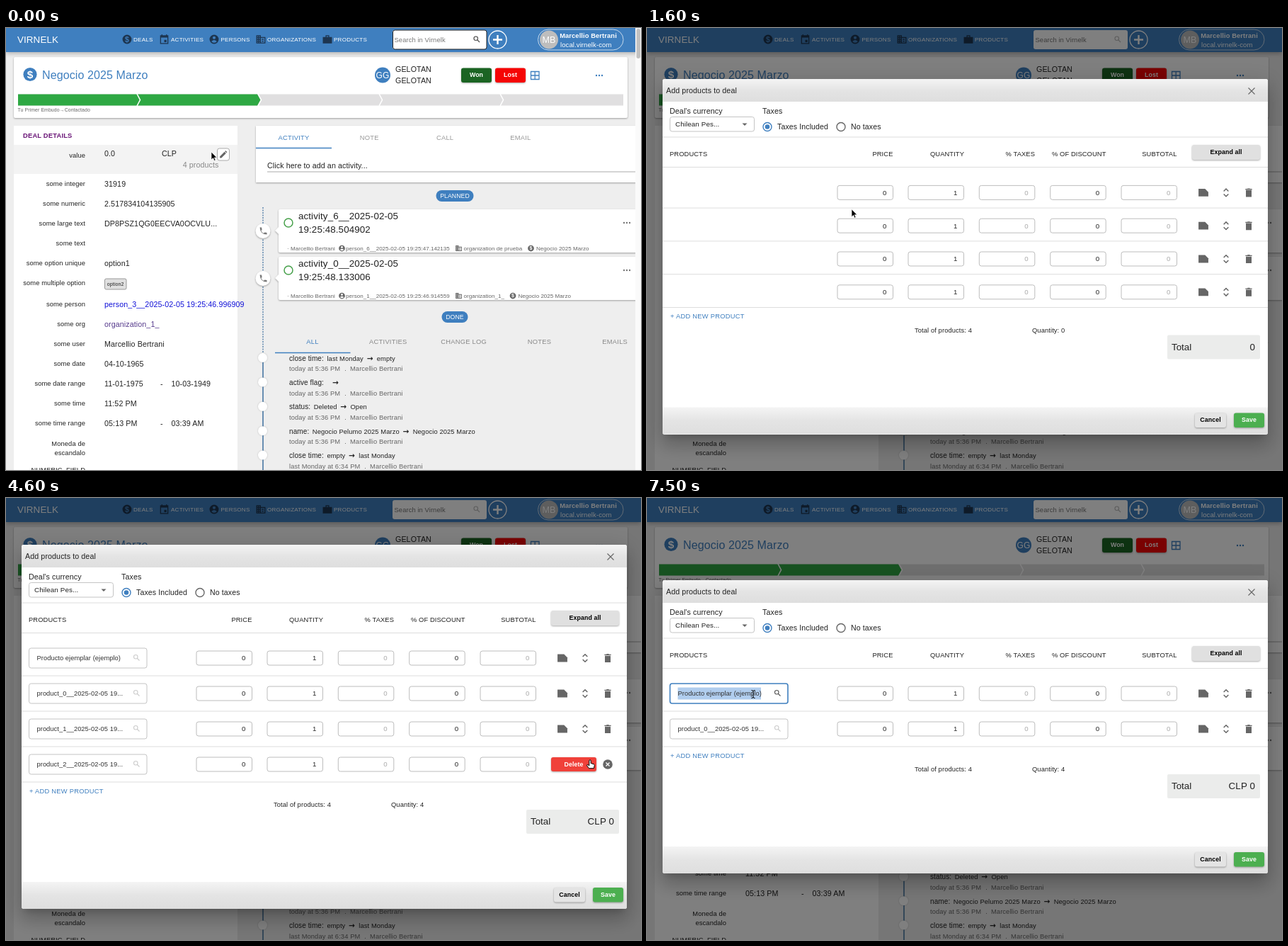
These frames come from a looping animation (897 px wide and 624 px high, 8000 ms). An HTML page:

```html
<!DOCTYPE html>
<html lang="en">
<head>
<meta charset="utf-8">
<title>Deal products</title>
<style>
html, body { margin: 0; width: 100%; height: 100%; overflow: hidden; background: #eee; }
body { position: relative; }
#page, #shade, #pointer { position: absolute; left: 0; top: 0; width: 897px; height: 624px; }
#shade { background: #000; }
#modal { position: absolute; left: 22px; width: 855px; background: #fff; border-radius: 3px; overflow: hidden;
  box-shadow: 0 7px 10px -5px #0003, 0 16px 25px 2px #00000024, 0 6px 31px 5px #0000001f; }
svg { display: block; }
text { font-family: "Liberation Sans", Arial, sans-serif; letter-spacing: .1px; }
.caps { letter-spacing: .25px; }
.card { filter: drop-shadow(0 1px 1px #0005); }
.dot { filter: drop-shadow(0 .5px 1px #0003); }
.arrow { font: bold 10.5px "DejaVu Sans", sans-serif; }
</style>
</head>
<body>
<svg id="page" viewBox="0 0 897 624"></svg>
<div id="shade"></div>
<div id="modal"></div>
<svg id="pointer" viewBox="0 0 897 624"></svg>
<script>
const BLUE = '#3f7fbf', INK = '#222', GREY = '#666', USER = 'Marcellio Bertrani';
const el = id => document.getElementById(id);

// y is the vertical middle of the capitals
const text = (x, y, s, size = 10.68, fill = INK, extra = '') =>
  `<text x="${x}" y="${y + size * .35}" font-size="${size}" fill="${fill}" ${extra}>${s}</text>`;
const MID = 'text-anchor="middle"', END = 'text-anchor="end"', BOLD = 'font-weight="bold"', CAPS = 'class="caps"';
const rect = (x, y, w, h, fill, r = 0, extra = '') =>
  `<rect x="${x}" y="${y}" width="${w}" height="${h}" rx="${r}" fill="${fill}" ${extra}/>`;
const circle = (x, y, r, fill, extra = '') => `<circle cx="${x}" cy="${y}" r="${r}" fill="${fill}" ${extra}/>`;
const line = (d, stroke, width = 1, extra = '') =>
  `<path d="${d}" fill="none" stroke="${stroke}" stroke-width="${width}" ${extra}/>`;
const hline = (x1, x2, y, stroke, width) => line(`M${x1} ${y}H${x2}`, stroke, width);
const button = (x, y, w, h, fill, label, color = '#fff') =>
  rect(x, y, w, h, fill, 3, 'class="card"') +
  text(x + w / 2, y + h / 2 - .5, label, 8.8, color, `${MID} ${BOLD}`);
const dots = (x, y, fill) => [-4, 0, 4].map(d => circle(x + d, y, 1.2, fill)).join('');

// Glyphs on a 24 unit grid
const shapes = {
  calendar: 'M3 3h3V1h2v2h8V1h2v2h3v19H3zM5 8v12h14V8zM12 13h5v5h-5z',
  org: 'M2 3h10v4h10v14H2zM4 5h2v2H4zM8 5h2v2H8zM4 9h2v2H4zM8 9h2v2H8zM4 13h2v2H4zM8 13h2v2H8zM4 17h2v2H4zM8 17h2v2H8zM12 9h8v10h-8zM14 11h4v2h-4zM14 15h4v2h-4z',
  bag: 'M2 7h20v14H2zM8 7V3h8v4h-2V5h-4v2z',
  trash: 'M6 7h12v14H6zM5 4h4l1-1h4l1 1h4v2H5z',
  note: 'M3 5h12l6 6v8H3z',
  pencil: 'M3 21v-4L15 5l4 4L7 21zM16 4l2-2 4 4-2 2z',
  phone: 'M4 4h4l1 5-2 2q2 5 6 6l2-2 5 1v4Q5 20 4 4z',
};
const strokes = { unfold: 'M7 9l5-5 5 5M7 15l5 5 5-5', search: 'M14 14l6 6M15 9.5a5.5 5.5 0 1 1-11 0a5.5 5.5 0 1 1 11 0' };
function icon(kind, x, y, size, color, back = '#fff') {
  const body = kind === 'dollar' ? circle(12, 12, 10, color) + text(12, 12, '$', 16, back, `${MID} ${BOLD}`)
    : kind === 'person' ? circle(12, 12, 10, color) + circle(12, 8.5, 3.2, back) + `<path d="M6 16.5q6-6 12 0q-6 6-12 0" fill="${back}"/>`
    : strokes[kind] ? line(strokes[kind], color, 2.2)
    : `<path d="${shapes[kind]}" fill="${color}" fill-rule="evenodd"/>`;
  return `<g transform="translate(${x - size / 2} ${y - size / 2}) scale(${size / 24})">${body}</g>`;
}

function header() {
  const navy = '#1d3550';
  const nav = [['dollar', 171, 'DEALS', 180], ['calendar', 223.5, 'ACTIVITIES', 233], ['person', 294, 'PERSONS', 303.5],
    ['org', 360, 'ORGANIZATIONS', 369], ['bag', 454, 'PRODUCTS', 463]];
  return rect(0, 0, 897, 34, BLUE, 0, 'style="filter:drop-shadow(0 2px 3px #0004)"') +
    text(16, 16.5, 'VIRNELK', 13.4, '#fff') +
    nav.map(([kind, ix, label, x]) => icon(kind, ix, 16, 15.5, navy, BLUE) + text(x, 16, label, 8.1, '#fff', 'style="letter-spacing:.2px"')).join('') +
    rect(546, 3, 133, 27, '#fff', 3) + text(548.5, 16.5, 'Search in Virnelk', 9.35, '#777') + icon('search', 665, 16, 12, '#bbb') +
    circle(694.5, 16.5, 12.5, 'none', 'stroke="#fff" stroke-width="1.3"') + line('M694.5 10v13M688 16.5h13', '#fff', 2.4) +
    rect(751.5, 2, 120.5, 29, 'none', 14.5, 'stroke="#c5d9ec"') + circle(767, 16.5, 13, '#bdbdbd') +
    text(767, 16.5, 'MB', 12.5, '#fff', MID) +
    text(822.5, 10.5, USER, 9.35, '#fff', `${MID} ${BOLD}`) + text(783, 23.5, 'local.virnelk-com', 9.5, '#fff');
}

function dealCard() {
  const chevrons = [185, 356, 527, 698].map(x => line(`M${x} 93l4.5 8.5-4.5 8.5`, '#fff', 1.6)).join('');
  return rect(11, 41, 867, 86, '#fff', 2, 'class="card"') + icon('dollar', 34, 65.5, 23, BLUE) +
    text(51, 66.5, 'Negocio 2025 Marzo', 16.03, BLUE) +
    circle(532, 66.5, 11, BLUE) + text(532, 66.5, 'GG', 12, '#fff', MID) +
    [58.5, 74.5].map(y => text(550, y, 'GELOTAN')).join('') +
    button(643, 56.5, 43, 20.5, '#1b6423', 'Won') + button(691, 56.5, 43, 20.5, '#f50505', 'Lost') +
    line('M741.5 61.5h11.5v11h-11.5zM747.2 61.5v11M741.5 67H753', BLUE, 1.3) + dots(838, 67, BLUE) +
    rect(17, 93.5, 855, 16, '#e0dfe0') + `<path d="M17 93.5h338l4.5 8-4.5 8H17z" fill="#2ea843"/>` + chevrons +
    text(16.5, 115.5, 'Tu Primer Embudo→Contactado', 6.9, GREY);
}

function details() {
  const rows = [['integer', '31919'], ['numeric', '2.517834104135905'], ['large text', 'DP8PSZ1QG0EECVA0OCVLU...'], ['text', ''],
    ['option unique', 'option1'], ['multiple option', ''], ['person', 'person_3__2025-02-05 19:25:46.996909', '#1010d8'],
    ['org', 'organization_1_', '#563a8c'], ['user', USER], ['date', '04-10-1965'], ['date range', '11-01-1975', INK, '10-03-1949'],
    ['time', '11:52 PM'], ['time range', '05:13 PM', INK, '03:39 AM']];
  const label = (y, s) => text(112, y, s, 9.35, INK, END);
  return rect(11, 138, 316, 500, '#fff') + '<g id="hover"></g>' +
    text(24, 152, 'DEAL DETAILS', 9.35, '#6a1577', `${BOLD} style="letter-spacing:.2px"`) +
    label(179.5, 'value') + text(139, 177.5, '0.0') + text(220, 177.5, 'CLP') + text(300.5, 193.5, '4 products', 10.68, '#888', END) +
    rows.map(([name, value, color, until], i) => {
      const y = 220 + 28 * i + (i > 5 ? 2 : 0);
      return label(y, 'some ' + name) + text(139, y, value, 10.68, color) + (until ? text(218, y, '-') + text(233.5, y, until) : '');
    }).join('') +
    rect(139.5, 354, 30.5, 15, '#e0e0e0', 2, 'stroke="#999"') + text(154.7, 361.5, 'option2', 7, INK, MID) +
    label(586.5, 'Moneda de') + label(600, 'escandalo') + label(623.5, 'NUMERIC_FIELD');
}

const tabs = (x, y, names, color) => names.map((name, i) =>
  text(x + 106.8 * i, y, name, 9.35, i ? color : BLUE, `${MID} ${CAPS}`)).join('');
const chip = (y, w, s) => rect(634 - w / 2, y - 8, w, 16, BLUE, 8) + text(634, y, s, 8.7, '#fff', MID);

function activity(y, title, clock, person, org, orgX, dealX) {
  const meta = (x, s) => text(x, y + 55, s, 8.02, GREY, 'style="letter-spacing:.03px"');
  const mark = (kind, x) => icon(kind, x, y + 55, 10.5, GREY);
  return `<g class="card">${rect(385, y, 520, 61, '#fff', 2)}<path d="M385 ${y + 25}l-5 5 5 5z" fill="#fff"/>${circle(363, y + 30.5, 10.5, '#fff')}</g>` +
    icon('phone', 363.5, y + 30.5, 15, '#777') + circle(399, y + 19, 6, 'none', 'stroke="#46a04a" stroke-width="1.5"') +
    text(413, y + 9.5, title, 13.36) + text(413, y + 28.5, clock, 13.36) + dots(877, y + 19, '#777') +
    meta(397, '·') + meta(402, USER) + mark('person', 474.5) + meta(480, person) + mark('org', orgX - 7) + meta(orgX, org) +
    mark('dollar', dealX - 7.5) + meta(dealX, 'Negocio 2025 Marzo');
}

function feed() {
  const log = [['close time:', 'last Monday', 'empty'], ['active flag:', '&#160;', ''], ['status:', 'Deleted', 'Open'],
    ['name:', 'Negocio Pelumo 2025 Marzo', 'Negocio 2025 Marzo'], ['close time:', 'empty', 'last Monday']];
  return rect(353, 138, 560, 80, '#fff', 0, 'class="card"') + tabs(406.5, 154.5, ['ACTIVITY', 'NOTE', 'CALL', 'EMAIL'], '#999') +
    hline(353, 460, 169.5, BLUE, 1.4) + text(369, 194.5, 'Click here to add an activity...') + hline(369, 897, 203, '#aaa') +
    chip(237, 53, 'PLANNED') + line('M363 253V458', '#3d6f9e', 1.2, 'stroke-dasharray="2 1.5"') +
    activity(256, 'activity_6__2025-02-05', '19:25:48.504902', 'person_6__2025-02-05 19:25:47.142135', 'organization de prueba', 646.5, 749) +
    activity(323, 'activity_0__2025-02-05', '19:25:48.133006', 'person_1__2025-02-05 19:25:46.914559', 'organization_1_', 646.5, 723.5) +
    chip(408, 37, 'DONE') + tabs(433, 443, ['ALL', 'ACTIVITIES', 'CHANGE LOG', 'NOTES', 'EMAILS'], '#888') + hline(380, 486.5, 458.5, BLUE, 1.4) +
    line('M363 465V624', '#3d6f9e', 1.5) +
    log.map(([label, from, to], i) => {
      const y = 466 + 34.4 * i, when = i < 4 ? 'today at 5:36 PM' : 'last Monday at 6:34 PM';
      const part = (s, gap, extra = '') => `<tspan dx="${gap}" font-size="9.35" ${extra}>${s}</tspan>`;
      return circle(362.5, y - .5, 6.5, '#fff', 'class="dot"') +
        text(400, y, label + part(from, 4.5) + part('→', 5, 'class="arrow"') + part(to, 5), 10) +
        text(400, y + 15, when + part('.', 6) + part(USER, 5), 9.35, GREY);
    }).join('');
}

el('page').innerHTML = rect(0, 0, 897, 624, '#eee') + dealCard() + details() + feed() + header() + '<g id="idle"></g>';
el('hover').innerHTML = rect(11, 165, 316, 41, '#f3f3f3') + rect(298.5, 170, 17, 17, '#fff', 3, 'stroke="#aaa"') + icon('pencil', 307, 178.5, 13, GREY);
el('idle').innerHTML = rect(546.5, 3, 132.5, 27, 'none', 3, 'stroke="#222"') + icon('search', 665, 16, 12, '#555') +
  rect(889, 0, 8, 624, '#fafafa') + rect(890.5, 1, 5.5, 42, '#c1c1c1', 2.7);

// Pointer path: time, x, y, shape
const path = [[0, 290, 175, 'arrow'], [300, 306, 179, 'hand'], [500, 301, 178, 'arrow'], [600, 300, 178, 'arrow'], [800, 289, 255, 'arrow'],
  [2000, 289, 256, 'arrow'], [2300, 150, 277, 'beam'], [2500, 150, 325, 'beam'], [2900, 735, 330, 'arrow'], [3300, 843, 380, 'hand'],
  [3500, 849, 395, 'hand'], [3800, 847, 373, 'hand'], [4600, 825, 370, 'hand'], [4700, 857, 329, 'hand'], [4800, 857, 329, 'arrow'],
  [4900, 857, 329, 'arrow'], [5200, 848, 350, 'hand'], [5400, 848, 350, 'hand'], [5800, 825, 346, 'hand'], [6100, 762, 362, 'arrow'],
  [6700, 140, 325, 'beam'], [6900, 150, 277, 'beam'], [8000, 150, 277, 'beam']];
const smooth = k => k * k * (3 - 2 * k);
const clamp = k => Math.min(1, Math.max(0, k));
function pointerAt(t) {
  const i = path.findIndex(p => p[0] > t), [t0, x0, y0, shape] = path[i - 1], [t1, x1, y1] = path[i];
  const k = smooth((t - t0) / (t1 - t0));
  return { x: x0 + (x1 - x0) * k, y: y0 + (y1 - y0) * k, shape };
}
const pointers = {
  arrow: '<path d="M0 0v11l2.6-2.4 1.6 3.8 1.8-.8-1.6-3.6h3.4z" stroke="#fff" stroke-width=".7"/>',
  hand: '<path d="M-1.2.5q1.2-1.6 2.4 0v4l4 1.2q1.3.6 1 2l-.8 4h-6.9l-3.1-4.2q.2-1.6 1.8-.7l1.6 1.2z" fill="#fff" stroke="#000"/>',
  beam: line('M-2.5-5.5q2.5 0 2.5 1.5q0-1.5 2.5-1.5M0-4v8M-2.5 5.5q2.5 0 2.5-1.5q0 1.5 2.5 1.5', '#000'),
};

const products = ['Producto ejemplar (ejemplo)', ...[0, 1, 2].map(i => `product_${i}__2025-02-05 19:25:47.5`)];

function productField(y, name, focused, hovered, selected) {
  const shown = focused || name.length < 30 ? name : name.slice(0, 24) + '...';
  return rect(32.5, y - 14, 166.5, 28, '#fff', 3, focused ? `stroke="${BLUE}" stroke-width="1.6"` : `stroke="${hovered ? INK : '#c4c4c4'}"`) +
    (selected ? rect(43.5, y - 8.5, 117.5, 17, '#b0cdee') : '') +
    `<svg x="43" y="${y - 10}" width="124" height="20">${text(.5, 10, shown, 9.35, '#333', 'style="letter-spacing:.04px"')}</svg>` +
    icon('search', 184.5, y - .5, 12, focused ? '#555' : '#ccc');
}

function row(y, confirm) {
  const cells = [[269, 0], [369, 1], [469.3, 0, 1], [569.7, 0], [670, 0, 1]].map(([x, value, off]) =>
    rect(x, y - 10, 78.5, 20, '#fff', 3, 'stroke="#bdbdbd"') + text(x + 69.5, y, value, 9.7, off ? '#aaa' : INK, END));
  const tools = confirm
    ? button(770, y - 10, 64, 20, '#f0413a', 'Delete') + circle(850, y, 6.8, GREY) + line(`M847.5 ${y - 2.5}l5 5m0-5l-5 5`, '#fff', 1.3)
    : icon('note', 786, y, 18.5, GREY) + icon('unfold', 818, y, 16, GREY) + icon('trash', 850, y, 16, GREY);
  return cells.join('') + tools;
}

function drawModal(t, pointer) {
  const loaded = t >= 1600, named = t >= 1700, priced = t >= 1800;
  const count = t < 4700 ? 4 : t < 5900 ? 3 : 2;
  const confirmRow = t >= 3500 && t < 4700 ? 3 : t >= 5300 && t < 5900 ? 2 : -1;
  const focusRow = t < 3500 ? 3 : t >= 7200 ? 0 : -1;
  const pitch = named ? 50 : 46.8, firstRow = named ? 160 : 160.4, half = named ? 25 : 21.7;
  const end = firstRow + pitch * (count - 1) + half;
  const height = loaded ? end + 179 : 211, top = 322.8 - height / 2, foot = height - 38;
  let out = `<defs><linearGradient id="bar" x2="0" y2="1"><stop stop-color="#f4f4f4"/><stop offset=".5" stop-color="#e4e4e4"/><stop offset="1" stop-color="#dedede"/></linearGradient></defs>` +
    rect(22, 0, 855, 32, 'url(#bar)') + text(27, 16, 'Add products to deal') + line('M849.5 12.5l9 9m0-9l-9 9', GREY, 1.1) +
    text(32, 45.5, "Deal's currency") + rect(32.5, 53.5, 119, 20.5, '#fff', 3, 'stroke="#c4c4c4"') + text(40, 63.5, 'Chilean Pes...', 9.8) +
    `<path d="M134.5 62.5h7l-3.5 3.5z" fill="${GREY}"/>` + text(163, 45.5, 'Taxes') +
    circle(170, 67.5, 6, '#fff', `stroke="${BLUE}" stroke-width="1.4"`) + circle(170, 67.5, 3.3, BLUE) + text(184, 67, 'Taxes Included', 10.6) +
    circle(274, 67.5, 6, '#fff', `stroke="${GREY}" stroke-width="1.4"`) + text(288, 67, 'No taxes', 10.6) + hline(22, 877, 82, '#ddd') +
    rect(22, foot, 855, 38, 'url(#bar)') + button(774, foot + 8, 44, 20.5, '#e4e4e4', 'Cancel', '#000') + button(829, foot + 8, 43, 20.5, '#4caf50', 'Save');
  if (loaded) {
    out += text(32, 106, 'PRODUCTS', 9.35) +
      [[347.5, 'PRICE'], [448, 'QUANTITY'], [548, '% TAXES'], [648.5, '% OF DISCOUNT'], [748.5, 'SUBTOTAL']]
        .map(([x, s]) => text(x, 106, s, 9.35, INK, END)).join('') +
      button(770, 93, 96, 21, '#e0e0e0', 'Expand all', '#000') + hline(22, 877, 124.5, '#ddd');
    for (let i = 0; i < count; i++) {
      const y = firstRow + pitch * i;
      const hovered = pointer.x > 32 && pointer.x < 199 && Math.abs(pointer.y - top - y) < 14;
      if (named) out += productField(y, products[i], i === focusRow, hovered, i === 0 && t >= 7500);
      out += row(y, i === confirmRow) + hline(22, 877, y + half, '#ddd');
    }
    out += text(33, end + 12.5, '+ ADD NEW PRODUCT', 9.35, BLUE, CAPS) + text(378, end + 32, 'Total of products: 4', 9.35) +
      text(544, end + 32, `Quantity: ${priced ? 4 : 0}`, 9.35) + rect(735, end + 39, 131, 34, '#ebeceb', 2) +
      text(741, end + 55.5, 'Total', 13.36, INK, 'style="letter-spacing:0"') + text(859, end + 55.5, priced ? 'CLP 0' : '0', 13.36, INK, END);
  }
  const modal = el('modal');
  modal.style.top = top + 'px';
  modal.style.height = height + 'px';
  modal.innerHTML = `<svg width="855" height="${height}" viewBox="22 0 855 ${height}">${out}</svg>`;
}

let shownStep = -1;
function frame(now) {
  const step = Math.floor(now % 8000 / 100), t = step * 100;
  if (step !== shownStep) {
    shownStep = step;
    const pointer = pointerAt(t), open = smooth(clamp((t - 430) / 280));
    for (const id of ['hover', 'idle']) el(id).style.display = t < 400 ? '' : 'none';
    el('shade').style.opacity = open * .5;
    el('modal').style.opacity = clamp(open * 1.25);
    el('modal').style.filter = `brightness(${.65 + .35 * open})`;
    drawModal(t, pointer);
    el('pointer').innerHTML = `<g transform="translate(${pointer.x} ${pointer.y})">${pointers[pointer.shape]}</g>`;
  }
  requestAnimationFrame(frame);
}
requestAnimationFrame(frame);
</script>
</body>
</html>
```
